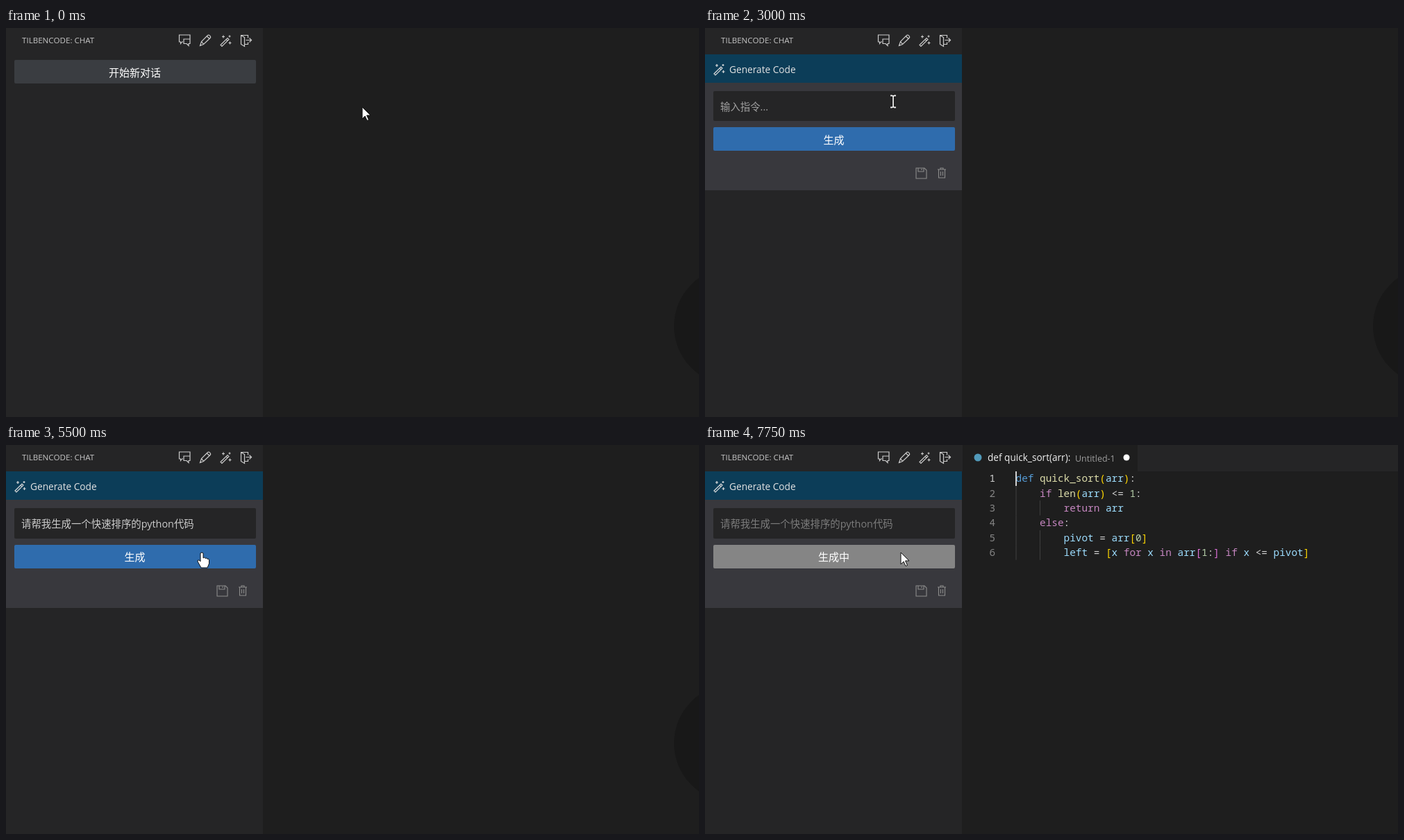
Animation of 998x561 px, one loop 8 s. Source, as an HTML page with a canvas:

```html
<!DOCTYPE html>
<html lang="zh">
<head>
<meta charset="utf-8">
<title>Generate Code</title>
<style>
html, body { margin: 0; width: 100%; height: 100%; overflow: hidden; background: #1e1e1e; }
canvas { display: block; }
</style>
</head>
<body>
<canvas width="998" height="561"></canvas>
<script>
const ctx = document.querySelector('canvas').getContext('2d');
const LOOP = 8000, STEP = 250;
const PANEL_AT = 2500, TYPE_FROM = 3250, TYPE_TO = 4750, BUSY_AT = 5750;
const CODE_FROM = 6270, EDITOR_AT = 6500, COLOUR_AT = 7500;

const UI = '"Open Sans", "Noto Sans CJK SC", "Noto Sans CJK", sans-serif';
const MONO = '"Noto Sans Mono", monospace';
const CHAR = 8.63, LINE = 21.4, CODE_X = 447.5, CODE_Y = 48;

const PROMPT = '请帮我生成一个快速排序的python代码';
const CODE = `def quick_sort(arr):
    if len(arr) <= 1:
        return arr
    else:
        pivot = arr[0]
        left = [x for x in arr[1:] if x <= pivot]
`;
const TOKEN = /\b(def)\b|\b(if|return|else|for|in)\b|\b(quick_sort|len)\b|\b(\d+)\b|([a-z]+)|([()\[\]])|(\s+|.)/g;
const TOKEN_COLOURS = ['#569cd6', '#c586c0', '#dcdcaa', '#b5cea8', '#9cdcfe', '#ffd700', '#d4d4d4'];

const ICONS = {
  chat: 'M6 10.500H4.500L2.500 13V10.500H.5V.5H16V6M7 6.500H16V13H14V16L11 13H7Z',
  pencil: 'M1 16L3 10L12 1Q14 0 15.500 2Q17 4 15 5.500L6 14ZM3 10L6 14M11 2.500L14.500 6',
  wand: 'M1 15L11 5L13 7L3 17ZM9 7L11 9M5 1V5M3 3H7M14 1V4M12.500 2.500H15.500M14.500 10V14M12.500 12H16.500',
  door: 'M11 5V1H1V14L6 17V4L1 1M6 14H11V11M8 8H16M13 5L16 8L13 11',
  save: 'M1 1H13L16 4V16H1ZM4 1V6H12V1M9 2V4',
  trash: 'M1 3H13M5 3V1H9V3M2.500 3V15H11.500V3M5.500 6V12M8.500 6V12'
};
const ARROW = 'M0 0V17L4 13L7 19.500L9.500 18.500L6.500 12H12Z';
const HAND = 'M-2 1Q0-1 2 1V8Q4 6 5 8.500Q7 7 8 9.500Q10 8 10.500 11V16L8 22H-1L-6 13Q-6 10-4 11L-2 13Z';
const BEAM = 'M-4-8.500H-1.500L0-7.500L1.500-8.500H4M0-7.500V7.500M-4 8.500H-1.500L0 7.500L1.500 8.500H4';

// time, x, y
const CURSOR_PATH = [
  [0, 513, 114], [1250, 512, 112], [2000, 327, 22], [2500, 327, 22],
  [3000, 271, 106], [4500, 271, 106], [5000, 284, 136], [5500, 282, 155], [LOOP, 282, 155]
];

const ramp = (t, from, to) => Math.min(1, Math.max(0, (t - from) / (to - from)));

function box(x, y, w, h, fill, radius = 0) {
  ctx.fillStyle = fill;
  ctx.beginPath();
  ctx.roundRect(x, y, w, h, radius);
  ctx.fill();
}

function disc(x, y, r, fill) {
  ctx.fillStyle = fill;
  ctx.beginPath();
  ctx.arc(x, y, r, 0, 2 * Math.PI);
  ctx.fill();
}

// y is the middle of the capital letters
function text(str, x, y, size, fill, align = 'left', family = UI) {
  ctx.font = `${size}px ${family}`;
  ctx.fillStyle = fill;
  ctx.textAlign = align;
  ctx.fillText(str, x, y + size * 0.36);
}

function shape(path, x, y, stroke, fill, width = 1.2) {
  const p = new Path2D(path);
  ctx.save();
  ctx.translate(x, y);
  ctx.lineWidth = width;
  ctx.strokeStyle = stroke;
  if (fill) {
    ctx.fillStyle = fill;
    ctx.fill(p);
  }
  ctx.stroke(p);
  ctx.restore();
}

function cursorAt(t) {
  const i = CURSOR_PATH.findIndex(key => key[0] > t);
  const [t0, x0, y0] = CURSOR_PATH[i - 1], [t1, x1, y1] = CURSOR_PATH[i];
  const k = ramp(t, t0, t1);
  return { x: x0 + (x1 - x0) * k, y: y0 + (y1 - y0) * k };
}

function drawToolbar(hover) {
  text('TILBENCODE: CHAT', 23, 18, 11.6, '#c5c5c5');
  if (hover) box(305, 7, 22, 22, '#363738', 4);
  ['chat', 'pencil', 'wand', 'door'].forEach((name, i) =>
    shape(ICONS[name], 249 + 29.5 * i, 9.5, '#cccccc'));
}

function drawPanel(t) {
  const typed = PROMPT.slice(0, Math.floor(PROMPT.length * ramp(t, TYPE_FROM, TYPE_TO)));
  const busy = t >= BUSY_AT;
  const shift = typed ? 1 : 0;
  box(0, 38, 370, 41, '#0c3d58');
  box(0, 79, 370, 155 + shift, '#38383d');
  shape(ICONS.wand, 12, 51, '#dddddd');
  text('Generate Code', 35, 60, 13.7, '#e2e2e2');
  box(12, 91, 348, 43 + shift, '#252526', 2);
  text(typed || '输入指令...', 22, 114, 14.4, busy ? '#7c7c7c' : typed ? '#cccccc' : '#a0a0a0');
  box(12, 143 + shift, 348, 34, busy ? '#858585' : '#2f6cad', 2);
  text(busy ? '生成中' : '生成', 185.5, 161.5 + shift / 2, 15, '#ffffff', 'center');
  shape(ICONS.save, 303, 201 + shift, '#8c8c8c', null, 1.1);
  shape(ICONS.trash, 334, 201 + shift, '#8c8c8c', null, 1.1);
}

function drawTab(coloured) {
  box(370, 0, 628, 38, '#252526');
  box(371, 0, 252, 38, '#1e1e1e');
  if (coloured) disc(393, 18, 5.5, '#519aba');
  else shape('M0 0H8M0 3.500H10M0 7H7M0 10.500H10', 390.5, 12.5, '#cccccc');
  text('def quick_sort(arr):', 407, 18.5, 13.6, '#f0f0f0');
  text('Untitled-1', 533, 19, 12.5, '#9d9d9d');
  disc(607, 18, 4.5, '#ffffff');
}

function drawCode(t, coloured) {
  const count = Math.floor(Math.max(0, t - CODE_FROM) * 73 / 750);
  CODE.slice(0, count).trimEnd().split('\n').forEach((line, row) => {
    const y = CODE_Y + row * LINE;
    text(row + 1, 418, y, 14.38, row ? '#858585' : '#d0d0d0', 'right', MONO);
    const indent = line.search(/\S|$/);
    for (let col = 0; col < indent; col += 4)
      box(CODE_X + col * CHAR, y - LINE / 2, 1, LINE, '#404040');
    let depth = 0;
    for (const match of line.matchAll(TOKEN)) {
      const kind = match.slice(1).findIndex(Boolean);
      let fill = TOKEN_COLOURS[kind];
      if (kind === 5) {
        const opening = '(['.includes(match[0]);
        if (!opening) depth--;
        if (depth > 0) fill = '#da70d6';
        if (opening) depth++;
      }
      text(match[0], CODE_X + match.index * CHAR, y, 14.38,
        coloured ? fill : '#d4d4d4', 'left', MONO);
    }
  });
  if (Math.floor(t / 500) % 2) box(447, CODE_Y - 10, 2, 21, '#d0d0d0');
}

function drawCursor({ x, y }, hand, beam) {
  if (beam) {
    shape(BEAM, x, y, '#111111', null, 3.4);
    shape(BEAM, x, y, '#eeeeee', null, 1.8);
  } else {
    shape(hand ? HAND : ARROW, x, y, '#111111', '#ffffff', 1);
  }
}

function draw(t) {
  const panel = t >= PANEL_AT, editor = t >= EDITOR_AT, coloured = t >= COLOUR_AT;
  const cursor = cursorAt(t);
  const onWand = cursor.y < 30 && cursor.x > 304 && cursor.x < 328;
  const onInput = panel && cursor.y > 91 && cursor.y < 135;
  const onButton = panel && t < BUSY_AT && cursor.y > 143;

  box(0, 0, 998, 561, '#1e1e1e');
  box(0, 0, 370, 561, '#252526');
  drawToolbar(onWand);
  if (panel) {
    drawPanel(t);
  } else {
    box(12, 46, 348, 34, '#3a3d41', 2);
    text('开始新对话', 185.5, 64.5, 15, '#ffffff', 'center');
  }
  if (editor) {
    drawTab(coloured);
    drawCode(t, coloured);
  } else {
    disc(1047, 430, 85, '#181818');
  }
  drawCursor(cursor, onWand || onButton, onInput);
}

function frame() {
  draw(Math.floor(performance.now() % LOOP / STEP) * STEP);
  requestAnimationFrame(frame);
}
frame();
</script>
</body>
</html>
```
